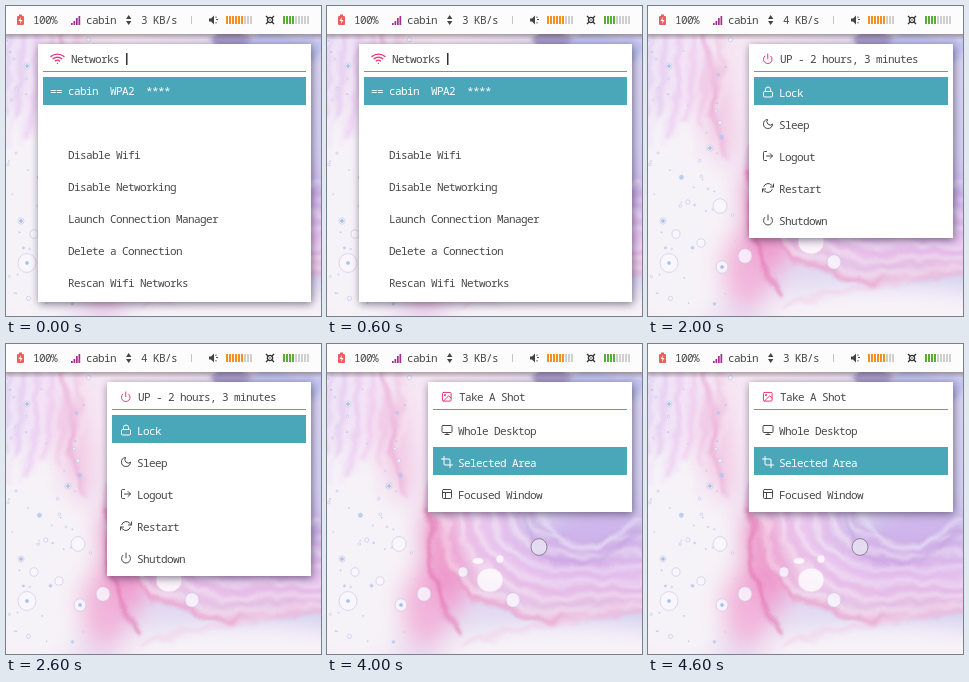
An HTML page that plays this animation: 315x310 px, repeating every 5000 ms.

```html
<!DOCTYPE html>
<html lang="en">
<head>
<meta charset="utf-8">
<style>
html, body { margin: 0; width: 315px; height: 310px; overflow: hidden; background: #fff; }
svg { display: block; }
text { font: 300 11px "Noto Sans Mono", "DejaVu Sans Mono", monospace; letter-spacing: -.6px; white-space: pre; }
.panel { filter: drop-shadow(1px 2px 4px rgba(30, 15, 50, .55)); }
.icon { fill: none; stroke-width: 2; stroke-linecap: round; stroke-linejoin: round; }
</style>
</head>
<body>
<svg width="315" height="310" viewBox="0 0 315 310">
  <defs>
    <linearGradient id="base" x2="1" y2=".4">
      <stop offset="0" stop-color="#eee5f6"/>
      <stop offset=".35" stop-color="#f7e8f4"/>
      <stop offset="1" stop-color="#d3d0f0"/>
    </linearGradient>
    <linearGradient id="shade" x2="0" y2="1">
      <stop offset="0" stop-color="#433" stop-opacity=".4"/>
      <stop offset="1" stop-color="#433" stop-opacity="0"/>
    </linearGradient>
    <filter id="marble" x="-20%" y="-20%" width="140%" height="140%" color-interpolation-filters="sRGB">
      <feGaussianBlur stdDeviation="2.2" result="soft"/>
      <feTurbulence type="fractalNoise" baseFrequency=".025" numOctaves="3" seed="8"/>
      <feDisplacementMap in="soft" scale="22" xChannelSelector="R" yChannelSelector="G"/>
    </filter>
    <filter id="haze" x="-50%" y="-50%" width="200%" height="200%"><feGaussianBlur stdDeviation="12"/></filter>
  </defs>
  <rect width="315" height="310" fill="url(#base)"/>
  <g id="glow" fill="none" filter="url(#haze)"></g>
  <g id="paint" fill="none" filter="url(#marble)"></g>
  <g id="drops"></g>
  <g id="panel"></g>
  <rect y="28" width="315" height="6" fill="url(#shade)"/>
  <rect width="315" height="28" fill="#fcfcfc"/>
  <g id="bar"></g>
</svg>
<script>
const TEAL = '#4aa6b9', GREEN = '#5aac2d', RED = '#f26b6b', PINK = '#ec2f77', INK = '#484848';
const NETWORK = 'cabin';
const $ = id => document.getElementById(id);
const rect = (x, y, w, h, fill, rx = 0) =>
  `<rect x="${x}" y="${y}" width="${w}" height="${h}" rx="${rx}" fill="${fill}"/>`;
const text = (x, y, s, fill = INK) => `<text x="${x}" y="${y}" fill="${fill}">${s}</text>`;
const stroke = (d, color, width, alpha = 1) =>
  `<path d="${d}" stroke="${color}" stroke-width="${width}" opacity="${alpha}"/>`;
const ring = (x, y, r) => `M${x - r} ${y}a${r} ${r} 0 1 0 ${2 * r} 0a${r} ${r} 0 1 0 ${-2 * r} 0`;
const box = 'M5 3h14a2 2 0 0 1 2 2v14a2 2 0 0 1-2 2H5a2 2 0 0 1-2-2V5a2 2 0 0 1 2-2z';

const icons = {
  wifi: 'M5 12.55a11 11 0 0 1 14 0M1.4 9a16 16 0 0 1 21.2 0M8.5 16.1a6 6 0 0 1 7 0M12 20h.01',
  music: 'M9 18V5l12-2v13' + ring(6, 18, 3) + ring(18, 16, 3),
  play: 'M5 3l14 9-14 9z',
  stop: box,
  prev: 'M19 20L9 12l10-8zM5 19V5',
  next: 'M5 4l10 8-10 8zM19 5v14',
  repeat: 'M17 1l4 4-4 4M3 11V9a4 4 0 0 1 4-4h14M7 23l-4-4 4-4M21 13v2a4 4 0 0 1-4 4H3',
  shuffle: 'M16 3h5v5M4 20L21 3M21 16v5h-5M15 15l6 6M4 4l5 5',
  power: 'M18.4 6.6a9 9 0 1 1-12.8 0M12 2v10',
  lock: 'M5 11h14a2 2 0 0 1 2 2v7a2 2 0 0 1-2 2H5a2 2 0 0 1-2-2v-7a2 2 0 0 1 2-2zM7 11V7a5 5 0 0 1 10 0v4',
  moon: 'M21 12.8A9 9 0 1 1 11.2 3 7 7 0 0 0 21 12.8z',
  exit: 'M9 21H5a2 2 0 0 1-2-2V5a2 2 0 0 1 2-2h4M16 17l5-5-5-5M21 12H9',
  refresh: 'M23 4v6h-6M1 20v-6h6M3.5 9a9 9 0 0 1 14.9-3.4L23 10M1 14l4.6 4.4A9 9 0 0 0 20.5 15',
  feed: 'M4 11a9 9 0 0 1 9 9M4 4a16 16 0 0 1 16 16' + ring(5, 19, 1),
  cast: 'M5 17H4a2 2 0 0 1-2-2V5a2 2 0 0 1 2-2h16a2 2 0 0 1 2 2v10a2 2 0 0 1-2 2h-1M12 15l5 6H7z',
  gear: ring(12, 12, 3) + ring(12, 12, 8.5) + 'M12 1v3M12 20v3M1 12h3M20 12h3M4 4l2 2M18 18l2 2M4 20l2-2M18 6l2-2',
  edit: 'M11 4H4a2 2 0 0 0-2 2v14a2 2 0 0 0 2 2h14a2 2 0 0 0 2-2v-7M18.5 2.5a2.1 2.1 0 0 1 3 3L12 15l-4 1 1-4z',
  image: box + ring(8.5, 8.5, 1.5) + 'M21 15l-5-5L5 21',
  screen: 'M4 3h16a2 2 0 0 1 2 2v10a2 2 0 0 1-2 2H4a2 2 0 0 1-2-2V5a2 2 0 0 1 2-2zM8 21h8M12 17v4',
  crop: 'M6 1v15a2 2 0 0 0 2 2h15M1 6h15a2 2 0 0 1 2 2v15',
  layout: box + 'M3 9h18M9 21V9'
};
const icon = (name, x, y, color, scale = .5) =>
  `<path class="icon" d="${icons[name]}" stroke="${color}" transform="translate(${x} ${y}) scale(${scale})"/>`;

// Each row: icon, label, highlight colour
const menus = [
  { wide: true, icon: 'wifi', title: 'Networks', x: 65, rate: 3, rows: [
    ['', `== ${NETWORK}  WPA2  ****`, TEAL], ['', ''], ['', 'Disable Wifi'], ['', 'Disable Networking'],
    ['', 'Launch Connection Manager'], ['', 'Delete a Connection'], ['', 'Rescan Wifi Networks']] },
  { icon: 'music', title: 'Lantern Meadow', x: 134, rate: 3, rows: [
    ['play', 'Play', TEAL], ['stop', 'Stop'], ['prev', 'Previous'], ['next', 'Next'],
    ['repeat', 'Repeat', GREEN], ['shuffle', 'Shuffle', RED]] },
  { icon: 'power', title: 'UP - 2 hours, 3 minutes', x: 132, rate: 4, rows: [
    ['lock', 'Lock', TEAL], ['moon', 'Sleep'], ['exit', 'Logout'], ['refresh', 'Restart'], ['power', 'Shutdown']] },
  { icon: 'feed', title: `${NETWORK} : 106.215.191.199`, x: 134, rate: 4, rows: [
    ['wifi', 'Connected To Internet', GREEN], ['cast', 'Open Bandwidth Monitor', TEAL],
    ['gear', 'Open Network Manager'], ['edit', 'Open Connection Editor']] },
  { icon: 'image', title: 'Take A Shot', x: 132, rate: 3, rows: [
    ['screen', 'Whole Desktop'], ['crop', 'Selected Area', TEAL], ['layout', 'Focused Window']] }
];

function drawPanel({ wide, icon: head, title, x, rows }) {
  const left = wide ? 32 : 101, width = 305 - left;
  let out = rect(left, 38, width, 34 + 32 * rows.length, '#fff').replace('/>', ' class="panel"/>');
  out += wide ? icon(head, 44, 45, PINK, .62) : icon(head, 114, 47, PINK, .48);
  out += text(x, 57, title) + rect(left + 5, 65, width - 10, 1, TEAL);
  if (wide) out += rect(120, 47, 1.5, 12, '#333');
  rows.forEach(([name, label, fill], i) => {
    const y = 71 + 32 * i, color = fill ? '#fff' : INK;
    if (fill) out += rect(left + 5, y, width - 10, 28, fill);
    if (name) out += icon(name, 114, y + 9, color);
    out += text(wide ? (fill ? 44 : 62) : 131, y + (wide ? 18 : 20), label, color);
  });
  $('panel').innerHTML = out;
}

function meter(x, on, color) {
  let out = '';
  for (let i = 0; i < 9; i++) out += rect(x + 3 * i, 10, 2, 8, i < on ? color : '#cfcfcf');
  return out;
}

function drawBar(rate) {
  let out = rect(11, 10, 7, 9, '#ef5d5d', 1) + rect(13, 8.5, 3, 2, '#ef5d5d');
  out += '<path d="M15 11l-2.5 4h2l-.5 3 2.5-4h-2z" fill="#fff"/>' + text(27, 18, '100%');
  [2, 4, 7, 9].forEach((h, i) => out += rect(65 + 2.5 * i, 19 - h, 1.7, h, '#a52d92'));
  out += text(80, 18, NETWORK) + '<path d="M120 13l2.7-4 2.7 4zM120 15l2.7 4 2.7-4z" fill="#444"/>';
  out += text(135, 18, rate + ' KB/s') + rect(185, 10, 1, 8, '#c4c4c4');
  out += '<path d="M203 12.5h2l3-3v9l-3-3h-2z" fill="#444"/>' +
    '<path d="M210 10.5v1.5M210 13.5h2M210 16v1.5" stroke="#555" fill="none"/>' + meter(220, 6, '#f58f1f');
  out += `<path d="${ring(264, 14, 2.6)}" fill="none" stroke="#333" stroke-width="1.4"/>` +
    '<path d="M260 10l2 2M266 16l2 2M260 18l2-2M266 12l2-2M263.5 14h1" stroke="#333" stroke-width="1.3"/>';
  out += meter(277, 4, '#58ae35');
  $('bar').innerHTML = out;
}

function drawWallpaper() {
  let seed = 17;
  const rnd = () => (seed = seed * 16807 % 2147483647) / 2147483647;
  const lobe = (x, y, rx, ry, fill, turn = 0) =>
    `<ellipse cx="${x}" cy="${y}" rx="${rx}" ry="${ry}" fill="${fill}" transform="rotate(${turn} ${x} ${y})"/>`;
  $('glow').innerHTML = lobe(25, 215, 65, 110, '#f6f3f8') + lobe(240, 308, 130, 30, '#f8f2f8') +
    lobe(68, 105, 12, 55, '#f0bfe0', -8) + lobe(100, 262, 26, 40, '#f2b3da') +
    lobe(118, 215, 20, 50, '#ee94c9', -15) + lobe(265, 195, 60, 32, '#cdb4ea', -12);

  let out = lobe(225, 34, 20, 10, '#a59bc9') + lobe(280, 42, 40, 16, '#bfc2ee');
  // Faint streaks falling from the top left
  for (let i = 0; i < 12; i++) {
    const x = 7 * i - 6;
    out += stroke(`M${x + 14} 20C${x + 2} 60 ${x + 12} 90 ${x} ${110 + 40 * rnd()}`,
      `hsl(${270 + 5 * i} 60% ${i % 2 ? 93 : 83}%)`, 3 + 3 * rnd(), .55);
  }
  // Nested swirls turning right, pink outside and lavender inside
  for (let i = 0; i < 18; i++) {
    const k = i * 6;
    out += stroke(`M${102 + k} ${140 + k / 5}C${108 + k} ${228 - k / 4} ${140 + k} ${296 - k} 325 ${266 - .75 * k}`,
      `hsl(${324 - 3 * i} ${66 - i}% ${i % 3 == 1 ? 92 : 79 + 5 * rnd()}%)`, 3 + 5 * rnd(), .65);
  }
  out += stroke('M104 165C106 200 98 240 132 288', '#e067a8', 4, .7) +
    stroke('M114 195C125 245 165 272 235 276', '#ea86bd', 3, .6) +
    stroke('M198 165C200 225 250 235 320 190', '#b795dc', 3, .65) +
    stroke('M215 165C220 210 260 215 320 175', '#ece4f8', 5, .7) +
    stroke('M135 300C185 282 250 285 325 250', '#f1cbe4', 4, .7) +
    stroke('M56 20C68 60 64 100 76 152', '#e9a3d0', 5, .55);
  $('paint').innerHTML = out;

  const drop = (x, y, r, fill = '#fbf8fe', edge = '#c6c6e6', h = r * 1.05) =>
    `<ellipse cx="${x}" cy="${y}" rx="${r}" ry="${h}" fill="${fill}" stroke="${edge}" stroke-width=".8" opacity=".8"/>`;
  let dots = '';
  for (let i = 0; i < 55; i++) {
    const y = 32 + 270 * rnd(), x = (90 + y / 16) * rnd(), r = .5 + 1.6 * rnd() ** 2;
    dots += drop(x, y, r, rnd() < .5 ? '#b3c4ec' : '#f8f5fd', '#bcc6ea');
  }
  [[72, 200, 7], [21, 257, 9], [97, 250, 7], [74, 261, 6], [28, 228, 4], [53, 237, 4], [62, 142, 3],
    [136, 228, 5], [186, 256, 7], [21, 60, 3], [15, 215, 3]].forEach(([x, y, r]) => dots += drop(x, y, r));
  [[21, 257], [74, 261], [62, 142], [21, 60], [15, 215]].forEach(([x, y]) => dots += drop(x, y, 1.5, '#8fb0e4', '#a3bbe8'));
  dots += drop(163, 236, 13, '#fff', '#f3d3e8', 12) + drop(151, 217, 6, '#fff', '#f0c4e2', 3.5) +
    drop(173, 215, 4, '#fff', '#f0c4e2') + drop(212, 203, 8, '#e9e4f3', '#5f5c70');
  $('drops').innerHTML = dots;
}

drawWallpaper();
let shown = -1;
function tick() {
  const step = Math.floor(performance.now() % 5000 / 1000);
  if (step !== shown) {
    shown = step;
    drawPanel(menus[step]);
    drawBar(menus[step].rate);
  }
  requestAnimationFrame(tick);
}
tick();
</script>
</body>
</html>
```
